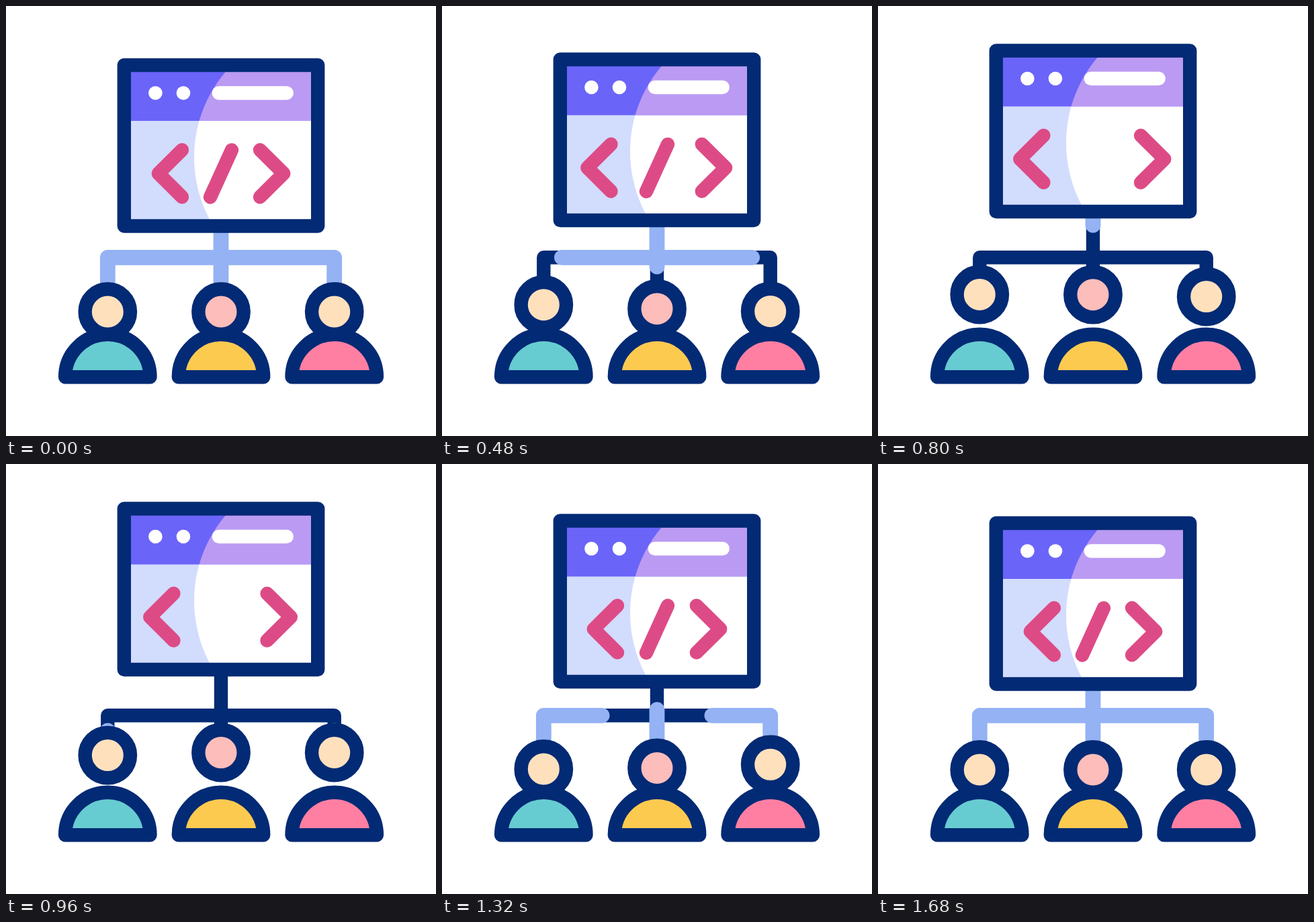
These frames come from a looping animation (640 by 640 pixels, 2 s). An HTML page:

```html
<!DOCTYPE html>
<html lang="en">
<head>
<meta charset="utf-8">
<title>Code team</title>
<style>
  html, body { margin: 0; height: 100%; overflow: hidden; background: #fff; }
  svg { display: block; width: 100%; height: 100%; }
  .line { fill: none; stroke-width: 20.4; stroke-linecap: round; stroke-linejoin: round; }
  .navy { stroke: #032a74; stroke-width: 20.4; stroke-linejoin: round; }
  .light { stroke: #94b2f4; stroke-width: 22.8; }
  .pink { stroke: #dd4b86; }
</style>
</head>
<body>
<svg viewBox="0 0 640 640">
  <path class="line navy" d="M151.3 430V374.3H488.7V430M320 300V430"/>
  <path class="line light" id="left" d="M151.3 412V374.3H320"/>
  <path class="line light" id="right" d="M488.7 412V374.3H320"/>
  <path class="line light" id="stem" d="M320 412V300"/>
  <g id="people"></g>
  <g id="monitor">
    <path fill="#d2dcfd" d="M176 88H464V327H176Z"/>
    <path fill="#6a64f9" d="M176 88H464V171H176Z"/>
    <path fill="#fff" d="M287.5 171A198 198 0 0 0 302.9 317.5H460V171Z"/>
    <path fill="#bb9af3" d="M326.7 98A198 198 0 0 0 287.5 171H460V98Z"/>
    <path class="navy" fill="none" d="M175.8 88H464.2V327.5H175.8Z"/>
    <g fill="#fff"><circle cx="222.4" cy="129.5" r="10.3"/><circle cx="264" cy="129.5" r="10.3"/></g>
    <path class="line" stroke="#fff" d="M316.8 129.5H417.7"/>
    <path class="line pink" id="open" d="M262 214.3L226.8 249.2L262 284.2"/>
    <path class="line pink" id="slash" d="M304 284.5L335.9 214.4"/>
    <path class="line pink" id="close" d="M378 214.3L413.3 249.2L378 284.2"/>
  </g>
</svg>
<script>
const LOOP = 2000;
const SIDE = 206.4, STEM = 112, SLASH = 77.1;
const $ = id => document.getElementById(id);

const people = [
  { x: 151.3, skin: '#ffe0bd', shirt: '#67ccd1', nod: [280, 740, 815, 1390] },
  { x: 320, skin: '#fdbdba', shirt: '#fdca50', nod: [360, 820, 955, 1410] },
  { x: 488.7, skin: '#ffe0bd', shirt: '#ff7fa2', nod: [440, 900, 1027, 1490] }
];
$('people').innerHTML = people.map(({ x, skin, shirt }) => `
  <g class="navy" transform="translate(${x})">
    <path fill="${shirt}" d="M-63.2 552.2A63.2 63.4 0 0 1 63.2 552.2Z"/>
    <circle class="head" fill="${skin}" cy="455" r="33.7"/>
  </g>`).join('');
const heads = document.querySelectorAll('.head');

const ramp = (t, a, b) => Math.min(1, Math.max(0, (t - a) / (b - a)));
const ease = x => x * x * (3 - 2 * x);
const soft = x => (x + ease(x)) / 2;
// Rises from a to b, rests, then falls from c to d
const swing = (t, [a, b, c, d]) => ease(ramp(t, a, b)) - ease(ramp(t, c, d));
const shift = (el, x, y) => el.setAttribute('transform', `translate(${x} ${y})`);

// Shows only the part of a path between two distances
function trim(el, from, to) {
  const length = to - from;
  el.style.display = length > 0.1 ? '' : 'none';
  el.style.strokeDasharray = `${Math.max(0, length)} 2000`;
  el.style.strokeDashoffset = -from;
}

function draw(now) {
  const t = now % LOOP;

  shift($('monitor'), 0, -21.5 * swing(t, [240, 800, 980, 1440]));
  const spread = swing(t, [80, 730, 780, 1420]);
  shift($('open'), -15.6 * spread, 0);
  shift($('close'), 13.1 * spread, 0);
  trim($('slash'), 0, SLASH * (1 - swing(t, [650, 790, 1130, 1300])));

  people.forEach(({ nod }, i) => shift(heads[i], 0, -25.5 * swing(t, nod)));

  // Light drains up into the monitor, then grows back from the people
  const drain = Math.max(0, t - 120) ** 2;
  for (const id of ['left', 'right']) {
    if (t < 875) trim($(id), 4.97e-4 * drain, SIDE);
    else trim($(id), 0, SIDE * soft(ramp(t, 875, 1640)));
  }
  if (t < 1080) trim($('stem'), 1.85e-4 * drain, STEM);
  else trim($('stem'), 0, 92 * soft(ramp(t, 1080, 1560)));

  requestAnimationFrame(draw);
}
draw(0);
</script>
</body>
</html>
```
